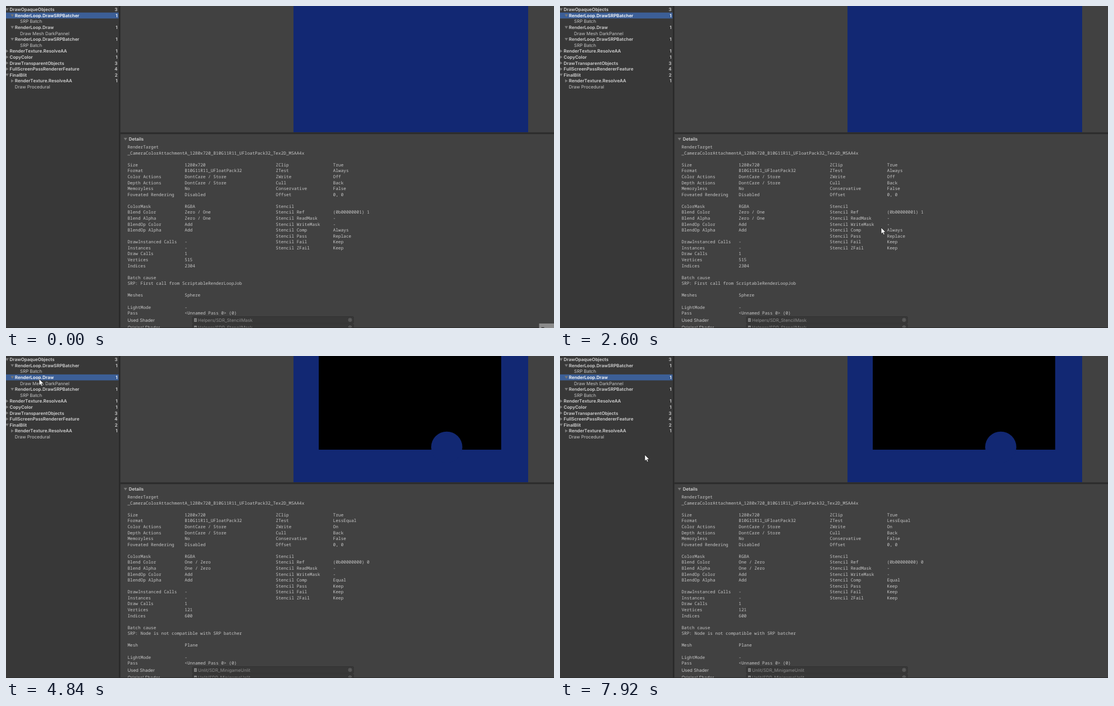
An HTML page that plays this animation: 976x574 px, repeating every 8 s.

```html
<!DOCTYPE html>
<html lang="en">
<head>
<meta charset="utf-8">
<title>Frame debugger</title>
<style>
html, body { margin: 0; width: 100%; height: 100%; overflow: hidden; background: #414141; }
svg { display: block; width: 976px; height: 574px; }
text { font: 7.94px Inter, sans-serif; font-kerning: none; fill: #c8c8c8; text-rendering: geometricPrecision; }
.bold { font-weight: 600; fill: #d4d4d4; }
.mono { font: 7.725px "Noto Sans Mono", "DejaVu Sans Mono", monospace; fill: #c6c6c6; }
.dim { fill: #8c8c8c; }
.on { fill: #fff; }
</style>
</head>
<body>
<svg id="stage" viewBox="0 0 976 574" xmlns="http://www.w3.org/2000/svg"></svg>
<script>
const LOOP = 8000, SWITCH = 4840, ROW = 10.585;
const stage = document.getElementById('stage');

function add(tag, attrs, parent = stage) {
  const el = document.createElementNS('http://www.w3.org/2000/svg', tag);
  for (const key in attrs) el.setAttribute(key, attrs[key]);
  return parent.appendChild(el);
}
const rect = (x, y, width, height, fill, parent) => add('rect', { x, y, width, height, fill }, parent);

// Text written "a~b" shows a for the first selected event and b for the second
const swaps = [];
function label(x, y, str, cls = '', anchor = 'start') {
  const el = add('text', { x, y, class: cls, 'text-anchor': anchor });
  const choice = str.split('~');
  el.textContent = choice[0];
  if (choice.length > 1) swaps.push({ el, choice });
  return el;
}
function arrow(x, y, open) {
  const d = open ? `M${x - 3} ${y - 2.3}h6l-3 4.8z` : `M${x - 2.2} ${y - 3}v6l4.8 -3z`;
  add('path', { d, fill: '#777' });
}

// Panels
rect(0, 0, 201, 574, '#383838');
rect(201, 0, 2.6, 574, '#292929');
rect(203.6, 225.3, 773, 3, '#2b2b2b');
rect(512, 0, 418, 225, '#122873');
const preview = add('g', {});
rect(557, 0, 325, 167, '#000', preview);
add('circle', { cx: 785, cy: 162.5, r: 27.8, fill: '#122873' }, preview);

// Event tree: indent is depth, v open, > closed, the last number is the count
const tree = `v DrawOpaqueObjects 3
 v RenderLoop.DrawSRPBatcher 1
  - SRP Batch
 v RenderLoop.Draw 1
  - Draw Mesh DarkPannel
 v RenderLoop.DrawSRPBatcher 1
  - SRP Batch
> RenderTexture.ResolveAA 1
> CopyColor 1
> DrawTransparentObjects 3
> FullScreenPassRendererFeature 4
v FinalBlit 2
 > RenderTexture.ResolveAA 1
 - Draw Procedural`;
const selection = rect(0, 0, 200.5, ROW, '#3c5f97');
const rows = tree.split('\n').map((line, i) => {
  const [, indent, kind, name, count] = line.match(/^( *)(\S) (.*?)(?: (\d))?$/);
  const x = 9.25 * indent.length, y = 9.3 + ROW * i, cls = count ? 'bold' : '';
  if (kind !== '-') arrow(x + 2, y - 2.9, kind === 'v');
  const parts = [label(x + 6.6, y, name, cls)];
  if (count) parts.push(label(198.6, y, count, cls, 'end'));
  return parts;
});

// Details: cells sit on a monospaced grid
const details = `RenderTarget
_CameraColorAttachmentA_1280x720_B10G11R11_UFloatPack32_Tex2D_MSAA4x

Size|1280x720|ZClip|True
Format|B10G11R11_UFloatPack32|ZTest|Always~LessEqual
Color Actions|DontCare / Store|ZWrite|Off~On
Depth Actions|DontCare / Store|Cull|Back
Memoryless|No|Conservative|False
Foveated Rendering|Disabled|Offset|0, 0

ColorMask|RGBA|Stencil
Blend Color|Zero / One~One / Zero|Stencil Ref|(0b00000001) 1~(0b00000000) 0
Blend Alpha|Zero / One~One / Zero|Stencil ReadMask|-
BlendOp Color|Add|Stencil WriteMask|-
BlendOp Alpha|Add|Stencil Comp|Always~Equal
||Stencil Pass|Replace~Keep
DrawInstanced Calls|-|Stencil Fail|Keep
Instances|-|Stencil ZFail|Keep
Draw Calls|1
Vertices|515~121
Indices|2304~600

Batch cause
SRP: First call from ScriptableRenderLoopJob~SRP: Node is not compatible with SRP batcher

Meshes~Mesh|Sphere~Plane

LightMode|-
Pass|<Unnamed Pass 0> (0)`;
const LEFT = 216.4, CHAR = 4.635, columns = [0, 22, 57, 79];
arrow(212.8, 237.3, true);
label(218.8, 240.2, 'Details', 'bold');
details.split('\n').forEach((line, i) => line.split('|').forEach((cell, c) => {
  if (cell) label(LEFT + CHAR * columns[c], 254.2 + 10.57 * i, cell, 'mono');
}));

function shaderField(name, y) {
  label(LEFT, y + 2.9, name);
  add('rect', { x: 332, y: y - 6, width: 287, height: 12, rx: 1.5, fill: '#383838', stroke: '#303030', 'stroke-width': .7 });
  rect(335, y - 3, 4.8, 6.4, '#8a8a8a');
  for (const dy of [-.8, 1]) rect(336, y + dy, 2.6, .7, '#484848');
  label(342, y + 2.9, 'Helpers/SDR_StencilMask~Unlit/SDR_MinigameUnlit', 'dim');
  add('circle', { cx: 612.8, cy: y, r: 2.8, fill: 'none', stroke: '#8a8a8a', 'stroke-width': .7 });
  add('circle', { cx: 612.8, cy: y, r: 1.1, fill: '#8a8a8a' });
}
shaderField('Used Shader', 559.6);
shaderField('Original Shader', 572.9);
rect(0, 573, 976, 1, '#2c2c2c');

const corner = add('g', {});
rect(949.5, 566, 26.5, 8, '#8b8b8b', corner);
rect(953.5, 572.6, 5, 1.4, '#3a3a3a', corner);

const cursor = add('path', {
  d: 'M0 0V11.3L2.6 8.9L4.4 12.9L6.3 12.1L4.6 8.2H8.1Z',
  fill: '#fff', stroke: '#111', 'stroke-width': .7, 'stroke-linejoin': 'round'
});

// Pointer stops: arrival time, x, y. It rests, then leaves in time for the distance.
const stops = [
  [70, 950, 556], [830, 655, 365], [1500, 648, 362], [1770, 650, 383],
  [2130, 604, 421], [2470, 572, 395], [3100, 500, 409], [3360, 597, 410.5],
  [3640, 496, 405], [4490, 59, 41], [5800, 589, 344], [6000, 620, 391],
  [6770, 608, 407], [7370, 600, 403], [7630, 597, 429], [7920, 151, 176]
];
function tipAt(t) {
  const next = stops.findIndex(s => s[0] > t);
  if (next < 1) return stops.at(next).slice(1);
  const [t0, x0, y0] = stops[next - 1], [t1, x1, y1] = stops[next];
  const span = Math.min(t1 - t0, 100 + .9 * Math.hypot(x1 - x0, y1 - y0));
  const u = Math.max(0, 1 - (t1 - t) / span);
  const k = u * u * (3 - 2 * u);
  return [x0 + (x1 - x0) * k, y0 + (y1 - y0) * k];
}

function select(state) {
  const row = state ? 3 : 1;
  selection.setAttribute('y', 1.1 + ROW * row);
  rows.forEach((parts, i) => parts.forEach(p => p.classList.toggle('on', i === row)));
  swaps.forEach(({ el, choice }) => { el.textContent = choice[state]; });
  preview.setAttribute('visibility', state ? 'visible' : 'hidden');
}

let shown;
function draw(t) {
  const state = t < SWITCH ? 0 : 1;
  if (state !== shown) select(shown = state);
  const entered = t >= stops[0][0];
  corner.setAttribute('visibility', entered ? 'hidden' : 'visible');
  cursor.setAttribute('visibility', entered ? 'visible' : 'hidden');
  cursor.setAttribute('transform', `translate(${tipAt(t)})`);
}

let start;
function tick(now) {
  start ??= now;
  draw((now - start) % LOOP);
  requestAnimationFrame(tick);
}
draw(0);
requestAnimationFrame(tick);
</script>
</body>
</html>
```
